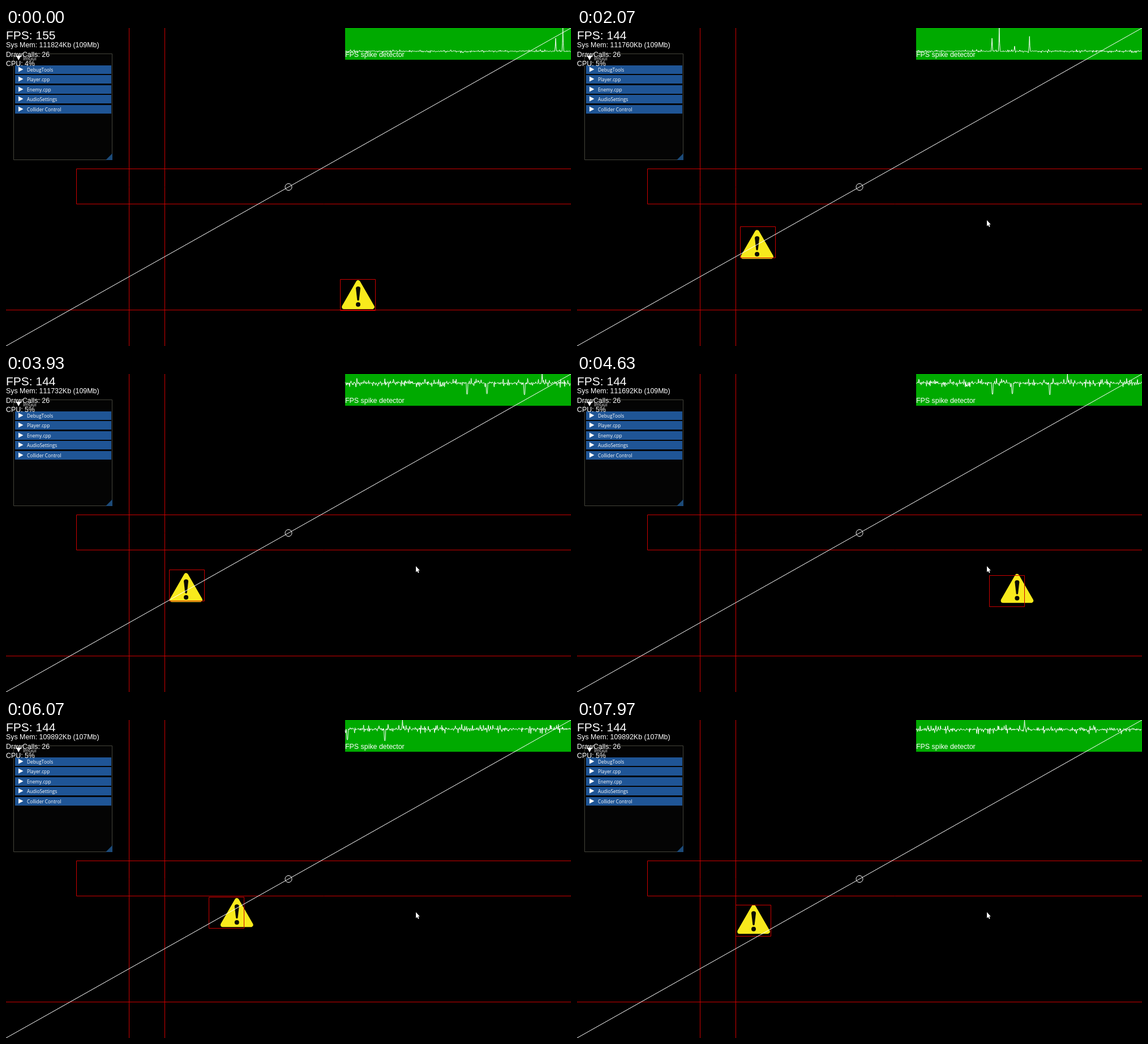
An HTML page with a canvas for the animation above (8000 ms loop, 998 px wide and 561 px high).

```html
<!DOCTYPE html>
<html lang="en">
<head>
<meta charset="utf-8">
<title>Debug scene</title>
<style>
html, body { margin: 0; width: 100%; height: 100%; overflow: hidden; background: #000; }
canvas { display: block; width: 998px; height: 561px; }
</style>
</head>
<body>
<canvas id="stage" width="998" height="561"></canvas>
<script>
const W = 998, H = 561, LOOP = 8000;
const ctx = document.getElementById('stage').getContext('2d');
const RED = '#cc0000', WHITE = '#fff', YELLOW = '#f8ea1c';
const SANS = '"Liberation Sans", Arial, sans-serif';
const UI = '"Open Sans", "Noto Sans", sans-serif';

// Physics, in px and ms; the sign is drawn LEAD ms ahead of its collider
const GRAVITY = 0.0009, LEAD = 15.5;
const CEILING = 311, FLOOR = 443, WALL = 281;
const RUN = 1.12, CREEP = 0.12, BRAKE = 170;
const JUMP = { speed: 0.5, times: [1343, 3222, 4412, 5600] };
const HOP = { start: 6318, every: 507, base: 348 };

// Runs out from the wall and back: leaving time, farthest x, time back at the wall
const TRIPS = [[-LOOP, 591, 2136], [2400, 700, 3996], [4230, 884, 5952], [6000, 840, 7220]];

// Readouts: time from which a value holds
const FPS = [[0, 155], [300, 144], [800, 143], [1500, 144], [5000, 143], [5900, 144]];
const MEM = [[0, 111824], [500, 111760], [3000, 111732], [4600, 111692], [6000, 109892]];
const CPU = [[0, 4], [1500, 5]];

// Graph of frame times, 1 being usual: sample index and value of the big spikes
const SAMPLES = 500, SAMPLE_MS = 1000 / 144;
const SPIKES = [
  [466, 2.53], [482, 3.73], [516, 1.6], [549, 2.75],
  [835, .5], [879, .52], [962, .48], [1001, 1.4], [1387, 1.43]
];

function random(n) {
  const s = Math.sin(n * 127.1 + 3.7) * 43758.5453;
  return s - Math.floor(s);
}

function sample(n) {
  const r = random(n) * 2 - 1;
  const spike = SPIKES.find(([at]) => Math.abs(at - n) < 2);
  if (!spike) return 1 + r * .05 + r ** 9 * .16;
  const [at, value] = spike;
  if (n === at) return value;
  return 1 + (value - 1) * (value < 1 ? .9 : .35);
}

function held(steps, t) {
  return steps.filter(([at]) => t >= at).pop()[1];
}

function playerX(t) {
  const [leave, far, back] = TRIPS.find(trip => t < trip[2]) || [0, WALL, LOOP];
  const left = back - t;
  const out = RUN * Math.max(0, t - leave);
  const home = Math.max(CREEP * left, RUN * (left - BRAKE));
  return WALL + Math.min(out, far - WALL, home);
}

function fall(y, speed, age) {
  return y + speed * age + GRAVITY * age * age / 2;
}

function playerY(t) {
  if (t >= HOP.start) {
    return fall(HOP.base, -GRAVITY * HOP.every / 2, (t - HOP.start) % HOP.every);
  }
  const start = JUMP.times.filter(at => at <= t).pop();
  if (start === undefined) return FLOOR;
  const age = t - start, v = JUMP.speed;
  const hit = (v - Math.sqrt(v * v - 2 * GRAVITY * (FLOOR - CEILING))) / GRAVITY;
  const y = age < hit ? fall(FLOOR, -v, age) : fall(CEILING, 0, age - hit);
  return Math.min(FLOOR, y);
}

// Movement over LEAD ms, from the motion just after t
function lead(pos, t) {
  return (pos(t + 1) - pos(t)) * LEAD;
}

function poly(points, fill) {
  ctx.beginPath();
  points.forEach(([x, y]) => ctx.lineTo(x, y));
  ctx.closePath();
  ctx.fillStyle = fill;
  ctx.fill();
}

function line(x1, y1, x2, y2, color) {
  ctx.beginPath();
  ctx.moveTo(x1, y1);
  ctx.lineTo(x2, y2);
  ctx.strokeStyle = color;
  ctx.lineWidth = 1;
  ctx.stroke();
}

function frame(x, y, w, h, color) {
  ctx.strokeStyle = color;
  ctx.lineWidth = 1;
  ctx.strokeRect(x + .5, y + .5, w, h);
}

function text(str, x, y, size, font = SANS) {
  ctx.font = `${size}px ${font}`;
  ctx.fontKerning = 'none';
  ctx.fillStyle = WHITE;
  ctx.fillText(str, x, y);
}

function drawSign(x, y) {
  ctx.save();
  ctx.translate(x, y);
  ctx.lineJoin = 'round';
  ctx.lineWidth = 8;
  ctx.strokeStyle = YELLOW;
  poly([[29, 4.5], [53.8, 47.5], [4.2, 47.5]], YELLOW);
  ctx.stroke();
  ctx.fillStyle = '#0c0c04';
  ctx.beginPath();
  ctx.moveTo(25, 15);
  ctx.quadraticCurveTo(25, 11.5, 29, 11.5);
  ctx.quadraticCurveTo(33, 11.5, 33, 15);
  ctx.lineTo(30.7, 35);
  ctx.quadraticCurveTo(29, 38, 27.3, 35);
  ctx.fill();
  ctx.beginPath();
  ctx.arc(29, 43.2, 4, 0, Math.PI * 2);
  ctx.fill();
  ctx.restore();
}

function drawPlayer(t) {
  const x = playerX(t), y = playerY(t);
  drawSign(x + 2 + lead(playerX, t), y + 1.5 + lead(playerY, t));
  frame(Math.round(x) - 1, Math.round(y), 62, 55, RED);
}

function drawWorld() {
  frame(124, 248, W, 62, RED);
  frame(217, -10, 63, H + 20, RED);
  line(0, 497.5, W, 497.5, RED);
}

function drawGraph(t) {
  const left = 599, tall = 56;
  ctx.fillStyle = '#00aa00';
  ctx.fillRect(left, 0, W - left, tall);
  const first = Math.floor(t / SAMPLE_MS);
  const values = Array.from({ length: SAMPLES }, (_, i) => sample(first + i));
  const max = Math.max(...values);
  ctx.beginPath();
  values.forEach((v, i) => ctx.lineTo(left + i * (W - left) / SAMPLES, tall - tall * v / max));
  ctx.strokeStyle = WHITE;
  ctx.lineWidth = 1;
  ctx.lineJoin = 'bevel';
  ctx.stroke();
  text('FPS spike detector', left, 51, 12.4);
}

function drawPanel() {
  ctx.fillStyle = '#040404';
  ctx.fillRect(13, 45, 175, 188);
  frame(13, 45, 174, 187, '#44443a');
  poly([[18, 49], [26.5, 49], [22.2, 57]], WHITE);
  text('ImGui', 30, 57, 8.3, UI);
  ['DebugTools', 'Player.cpp', 'Enemy.cpp', 'AudioSettings', 'Collider Control'].forEach((name, i) => {
    const y = Math.round(66 + i * 17.4);
    ctx.fillStyle = '#1f5596';
    ctx.fillRect(16, y, 170, 15);
    poly([[22, y + 2.5], [30.5, y + 7], [22, y + 11.5]], WHITE);
    text(name, 37, y + 11, 8.3, UI);
  });
  poly([[188, 221], [188, 233], [176, 233]], '#1c4a78');
}

function drawStats(t) {
  const mem = held(MEM, t);
  text(`FPS: ${held(FPS, t)}`, 0, 19.5, 21);
  text(`Sys Mem: ${mem}Kb (${Math.floor(mem / 1024)}Mb)`, 0, 34, 12.4);
  text('DrawCalls: 26', 0, 51, 12.4);
  text(`CPU: ${held(CPU, t)}%`, 0, 67, 12.4);
}

// The pointer glides in from below the stage
function drawCursor(t) {
  const p = Math.min(1, Math.max(0, (t - 450) / 330));
  const away = (1 - p) ** 2;
  const x = 724 - 84 * away, y = 339 + 236 * away;
  const arrow = [[0, 0], [0, 10.5], [2.3, 8.4], [4, 12], [5.6, 11.2], [4, 7.8], [6.8, 7.6]];
  poly(arrow.map(([dx, dy]) => [x + dx, y + dy]), WHITE);
}

function draw(t) {
  ctx.fillStyle = '#000';
  ctx.fillRect(0, 0, W, H);
  drawWorld();
  drawPlayer(t);
  drawGraph(t);
  line(0, H, W, 0, WHITE);
  ctx.beginPath();
  ctx.arc(499, 280.5, 6, 0, Math.PI * 2);
  ctx.stroke();
  drawPanel();
  drawStats(t);
  drawCursor(t);
}

// Thirty pictures a second, on 10 ms ticks
function tick(ms) {
  const start = k => Math.round(k * 10 / 3) * 10;
  let k = Math.floor(ms * .03) + 1;
  while (start(k) > ms) k--;
  return start(k);
}

function loop() {
  draw(tick(performance.now() % LOOP));
  requestAnimationFrame(loop);
}
loop();
</script>
</body>
</html>
```
